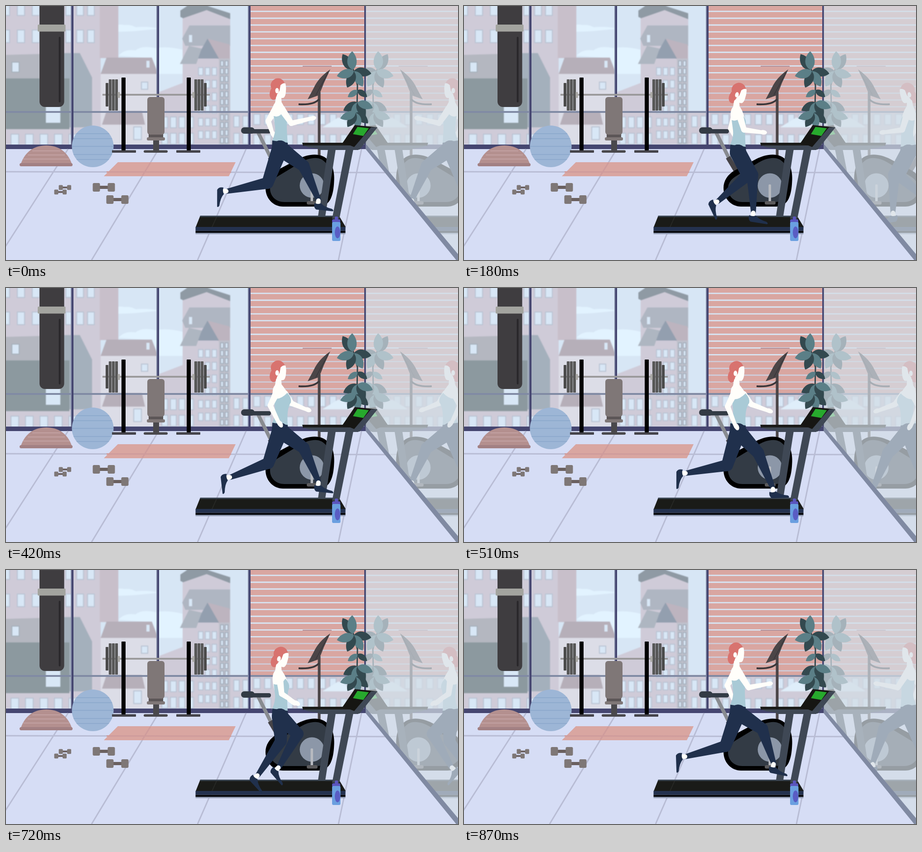
An HTML page with a canvas that plays this animation: 998 by 561 pixels, repeating every 0.9 s.

```html
<!DOCTYPE html>
<html lang="en">
<head>
<meta charset="utf-8">
<title>Treadmill run</title>
<style>
html, body { margin: 0; width: 100%; height: 100%; overflow: hidden; background: #d6ddf5; }
canvas { display: block; }
</style>
</head>
<body>
<canvas id="stage" width="998" height="561"></canvas>
<script>
const W = 998, H = 561, LOOP = 900, STEP = 30, MIRROR_X = 793, TAU = 2 * Math.PI;
const SKIN = '#fffefa', NAVY = '#20304c', STEEL = '#3f4855', FRAME = '#454670', GLASS = '#d8e7f6';
const WALL = '#cfcbd8', TEAL = '#5b7f87', DARK_LEAF = '#33494f';
let c = document.getElementById('stage').getContext('2d');

// ---- drawing helpers ----
function rect(color, x, y, w, h, r = 0) {
  c.fillStyle = color;
  c.beginPath();
  c.roundRect(x, y, w, h, r);
  c.fill();
}
function poly(color, ...p) {
  c.fillStyle = color;
  c.beginPath();
  for (let i = 0; i < p.length; i += 2) c.lineTo(p[i], p[i + 1]);
  c.fill();
}
function line(color, width, ...p) {
  c.strokeStyle = color;
  c.lineWidth = width;
  c.beginPath();
  for (let i = 0; i < p.length; i += 2) c.lineTo(p[i], p[i + 1]);
  c.stroke();
}
function shape(color, d) {
  c.fillStyle = color;
  c.fill(new Path2D(d));
}
function oval(color, x, y, rx, ry = rx, turn = 0) {
  c.fillStyle = color;
  c.beginPath();
  c.ellipse(x, y, rx, ry, turn, 0, TAU);
  c.fill();
}
// Tapered capsule between two points
function limb(color, ax, ay, ar, bx, by, br) {
  const a = Math.atan2(by - ay, bx - ax), q = Math.PI / 2;
  c.fillStyle = color;
  c.beginPath();
  c.arc(ax, ay, ar, a + q, a - q);
  c.arc(bx, by, br, a - q, a + q);
  c.fill();
}
function turned(x, y, degrees, paint) {
  c.save();
  c.translate(x, y);
  c.rotate(degrees * TAU / 360);
  paint();
  c.restore();
}
function panes(x, y, cols, rows, dx, dy, w, h, edge = '#b9c3d3') {
  for (let i = 0; i < cols; i++) for (let j = 0; j < rows; j++) {
    rect(edge, x + i * dx - 2, y + j * dy - 2, w + 4, h + 4);
    rect(GLASS, x + i * dx, y + j * dy, w, h);
  }
}
function layer(paint) {
  const canvas = document.createElement('canvas');
  canvas.width = W;
  canvas.height = H;
  const before = c;
  c = canvas.getContext('2d');
  paint();
  c = before;
  return canvas;
}

// ---- scenery ----
function city() {
  rect('#d7e6f5', 0, 0, W, H);
  shape('#e2f3ff', 'M190 57Q210 50 228 51Q242 38 262 42Q276 41 287 47Q310 44 340 50L300 54Q260 58 190 57Z');
  shape('#e2f3ff', 'M248 110Q262 94 286 98Q300 86 330 93Q360 88 395 98L395 150L330 150L320 115Z');
  // apartment block and its dark neighbour
  rect(WALL, 0, 0, 209, 306);
  rect('#c8bfca', 207, 0, 41, 115);
  panes(-7, -6, 3, 2, 33, 60, 14, 26);
  panes(133, -6, 3, 2, 24, 60, 13, 26);
  poly('#b4b7c0', 0, 108, 148, 104, 148, 162, 0, 162);
  panes(14, 125, 2, 1, 118, 1, 14, 20, '#a5b0bb');
  poly('#a4b0bc', 126, 104, 163, 104, 190, 158, 190, 268, 126, 268);
  rect('#8c999f', 0, 160, 140, 112);
  rect(GLASS, 88, 222, 32, 36);
  panes(12, 284, 5, 1, 32, 1, 15, 24);
  // terraced house
  rect('#dcdde7', 209, 148, 126, 158);
  poly('#b6afb9', 222, 114, 322, 114, 336, 150, 209, 150);
  rect(GLASS, 310, 121, 7, 15);
  poly('#b6afb9', 222, 232, 300, 232, 307, 262, 212, 262);
  panes(283, 268, 1, 1, 1, 1, 15, 26);
  panes(300, 169, 1, 1, 1, 1, 12, 14);
  // tower and gables
  poly(WALL, 390, 24, 442, 8, 495, 24, 495, 306, 338, 306, 338, 190, 390, 170);
  poly('#8f9aa4', 385, 10, 400, 0, 445, 0, 495, 16, 495, 29, 443, 9, 391, 27, 385, 24);
  poly('#afb6c2', 405, 43, 495, 43, 495, 88, 396, 88, 389, 72);
  rect(GLASS, 404, 64, 7, 16);
  poly('#bdb4bf', 445, 72, 494, 85, 494, 117, 468, 117);
  poly('#939faf', 445, 72, 420, 116, 470, 116);
  poly('#aeb6c1', 404, 88, 432, 94, 420, 128, 384, 128);
  rect('#bfc1cc', 470, 116, 25, 190);
  panes(475, 122, 2, 11, 10, 17, 4, 10, '#a3adbb');
  panes(426, 137, 3, 6, 15, 28, 8, 15);
  panes(345, 246, 4, 2, 19, 36, 11, 22);
  rect(WALL, 495, 232, 40, 74);
  panes(504, 244, 2, 2, 20, 38, 10, 22);
  // houses behind the blinds
  rect(WALL, 540, 150, 258, 156);
  panes(548, 240, 11, 2, 24, 45, 12, 21);
  poly('#dfeefa', 698, 268, 734, 246, 770, 268);
}
function blinds() {
  for (let y = -1.7; y < 225; y += 15.05) rect('#d9a6a1', 540, y, 252, 12.2);
  rect('#b0909a', 655, 132, 64, 2);
}
function floorAndFrames() {
  rect('#808aa4', 0, 232, 793, 4);
  for (const x of [143, 332, 534]) {
    rect('#8189a6', x, 0, 2, 306);
    rect(FRAME, x + 2, 0, 4, 306);
  }
  rect(FRAME, 791, 0, 3.5, 314);
  rect(FRAME, 0, 306, 794, 10);
  rect('#d6ddf5', 0, 316, W, 245);
  const grout = '#b8bcd4';
  line(grout, 3, 0, 366, 850, 368);
  line(grout, 3, 137, 316, -3, 534);
  line(grout, 3, 337, 316, 189, 561);
  line(grout, 3, 530, 316, 423, 561);
  line(grout, 3, 785, 316, 734, 561);
}
function dumbbell(x, y, s) {
  rect('#6a605f', x + 12 * s, y + 6 * s, 26 * s, 7 * s);
  for (const side of [0, 33]) rect('#7e7776', x + side * s, y, 16 * s, 19 * s, 3 * s);
}
function gymProps() {
  poly('#d9a6a1', 247, 345, 507, 345, 492, 376, 216, 376);
  line('#cf9c9c', 3, 222, 366.5, 497, 367);
  line('#cf9c9c', 3, 319, 346, 301, 375);
  // balance dome and ball
  shape('#b4908f', 'M33 348C42 322 62 308 89 308S136 322 145 348Z');
  for (let i = 0; i < 3; i++) line('#c8a9aa', 1.5, 58 - 10 * i, 320 + 9 * i, 120 + 10 * i, 320 + 9 * i);
  rect('#a28083', 30, 347, 117, 7, 3.5);
  oval('#9db6d6', 191.5, 310, 46);
  for (const dy of [-28, -17, 0, 18, 29]) {
    const half = Math.sqrt(46 * 46 - dy * dy);
    line('#8aa6ca', 1.5, 191.5 - half, 310 + dy, 191.5 + half, 310 + dy);
  }
  // punching bag
  rect('#3f3d40', 74, 0, 54.5, 223, [0, 0, 12, 12]);
  rect('#a3a49f', 70, 41, 61.5, 15.5, 2);
  rect('#29272a', 116.5, 68, 4, 145, 2);
  // rack and barbell
  rect('#9b9a9b', 213, 194, 237, 4);
  for (const side of [-1, 1]) {
    const part = (color, d, y, w, h) => rect(color, 331.5 + side * d - w / 2, y, w, h, 1);
    part('#44434a', 71, 318.5, 53, 5.5);
    part('#000', 72, 158, 9, 161);
    for (const d of [87.5, 94.5, 101.5]) part('#575757', d, 162, 6.2, 69);
    part('#4a4a4a', 108.5, 170, 6, 52);
    part('#aaa9a6', 82.5, 190, 5, 13);
  }
  // bench
  rect('#49484c', 304, 318.5, 53, 5.5, 3);
  rect('#49484c', 325, 295, 13, 25);
  rect('#5c5657', 315, 280, 32, 12);
  rect('#7f7777', 312, 201, 38, 83, 6);
  rect('#7f7777', 311, 290, 40, 7, 3);
  for (const i of [0, 1]) {
    dumbbell(191.5 + 30 * i, 391 + 27 * i, 1);
    dumbbell(116.5 - 10 * i, 395.5 + 10 * i, .56);
  }
}
// A fan of pointed leaves, alternating light and dark
function fan(x, y, size, from, to, count) {
  for (let i = 0; i < count; i++) turned(x, y, from + (to - from) * i / (count - 1), () => {
    const s = size / 40;
    shape(i % 2 ? TEAL : DARK_LEAF, `M0 0C${8 * s} ${-15 * s} ${28 * s} ${-14 * s} ${40 * s} 0C${28 * s} ${12 * s} ${8 * s} ${13 * s} 0 0Z`);
  });
}
function plant() {
  line(DARK_LEAF, 3, 764, 130, 776, 175, 774, 275);
  fan(765, 141, 41, -122, -91, 2);
  fan(768, 144, 39, 8, 164, 4);
  fan(776, 186, 26, 35, 145, 2);
  fan(776, 213, 36, 150, 20, 4);
  fan(772, 236, 36, 40, 160, 4);
}
function bike() {
  line('#888b90', 8, 557, 280, 586, 338);
  line('#454347', 11, 583, 334, 601, 364);
  rect('#333b45', 519, 268, 30, 14, 7);
  rect('#333b45', 528, 272, 57, 9.5, 4.5);
  rect('#4b4547', 688.5, 190, 6, 145);
  shape('#4b4547', 'M716 140Q690 158 680 180L666 206L691 197Q695 188 702 170Z');
  line('#38353a', 1.5, 711, 147, 684, 197);
  c.strokeStyle = '#3b373a';
  c.lineWidth = 4;
  c.stroke(new Path2D('M646 217Q680 219 691 206'));
  shape('#000', 'M573 402C573 386 582 372 598 363L645 338C664 328 685 325 700 332C721 342 727 366 724 394C722 421 714 443 690 443L612 443C589 443 573 424 573 402Z');
  shape('#333b45', 'M583 403C583 391 590 382 602 375L650 346C668 335 686 333 697 339C714 349 717 368 715 393C713 416 707 433 687 433L615 433C596 433 583 420 583 403Z');
  oval('#8c97a8', 675.5, 396.5, 27);
  rect('#b7bac0', 672.5, 394, 5.5, 40, 2);
  rect('#5c5b5d', 664, 431, 24, 7.5, 3.5);
}
function treadmill() {
  poly('#1a1b18', 429, 463, 735, 463, 750, 488, 419, 488);
  poly('#3b4652', 429, 463, 735, 463, 737, 466, 428, 466);
  line('#272825', 2, 465, 466, 455, 488);
  rect('#24324f', 418.5, 488, 331, 8.5);
  rect('#05070c', 418.5, 496.5, 331, 4.5);
  rect('#929cb3', 418.5, 501, 331, 3);
  poly(STEEL, 711, 316, 728, 316, 705, 464, 689, 464);
  poly(STEEL, 750, 316, 767, 316, 736, 470, 720, 470);
  poly('#1b1b19', 654, 302, 780, 302, 776, 309, 656, 309);
  poly(STEEL, 656, 308, 782, 308, 778, 318, 692, 318, 690, 315, 668, 312);
  poly('#161613', 742, 304, 770, 263, 820, 268, 780, 316, 760, 308);
  poly(STEEL, 806, 268, 820, 268, 781, 317, 764, 317);
  poly('#27a92d', 776, 267, 801, 270, 789, 287, 766, 283);
}
function bottle() {
  rect('#5a55bd', 726, 465, 7, 8, 2);
  rect('#5a55bd', 720, 471, 18, 8, 3);
  rect('#6a9fe0', 720, 477, 18.5, 42, 3);
  oval('#5a5dc4', 732, 500, 6, 13);
}

// ---- runner: every joint swings on the stride and its double ----
const swing = (a, mid, cos1, sin1 = 0, cos2 = 0, sin2 = 0) =>
  mid + cos1 * Math.cos(a) + sin1 * Math.sin(a) + cos2 * Math.cos(2 * a) + sin2 * Math.sin(2 * a);

function leg(a, hipY) {
  const kx = swing(a, 623, 40, -2, -6, -3), ky = swing(a, 372, -18, 2, -1, 6);
  const ax = swing(a, 590, 100, 19);
  const ay = Math.min(455, swing(a, 434, 8, 15, -14, -3));
  const footAngle = swing(a, 44, -41, -20, 3, -2);
  limb(NAVY, 605, hipY, 18, kx, ky, 13);
  limb(NAVY, kx, ky, 13, ax, ay, 5.5);
  turned(ax, ay, footAngle, () => {
    limb(SKIN, 0, 2, 5, 0, 9, 5);
    shape(NAVY, 'M-8 8Q0 11 6 7Q15 15 32 17Q37 20 34 22L-3 22Q-10 18 -8 8Z');
  });
}
function arm(sx, sy, ex, ey, hx, hy) {
  limb(SKIN, sx, sy, 8, ex, ey, 6);
  limb(SKIN, ex, ey, 6, hx, hy, 4);
  oval(SKIN, hx + 2, hy, 8, 5, Math.atan2(hy - ey, hx - ex));
}
function head(tilt) {
  turned(600, 207, tilt, () => {
    c.translate(-600, -207);
    shape('#d8736f', 'M616 173C613 160 600 156 591 163C584 168 583 176 586 182C580 191 581 203 588 207C594 209 598 204 599 198L608 190Z');
    shape(SKIN, 'M604 187L606 175Q612 169 617 171Q619 181 618 187Q618 197 614 202Q611 204 607 203L607 212L597 212L598 196Z');
    oval(SKIN, 598.5, 187, 4, 6);
  });
}
function runner(t) {
  const a = t / LOOP * TAU;
  const drop = swing(a, 5, 0, 0, -5), twist = swing(a, .5, -.45, -.15);
  const shoulderY = 226 + drop * .8, front = 618 + 10 * twist;
  arm(595 + 22 * twist, shoulderY + 8 * twist,
    swing(a, 606, -27, -9), swing(a, 263, 0, 0, -9),
    swing(a, 629, -40, -17), swing(a, 284, 8, 0, -8));
  c.save();
  c.translate(0, drop);
  head(drop * 1.3);
  limb(SKIN, 602, 203, 6, 601, 220, 8);
  shape(SKIN, `M596 212L607 211Q614 218 ${front} 240L617 265L595 265Q587 238 589 225Q590 217 596 212Z`);
  shape('#a9cad6', `M591 243Q605 248 ${front - 6} 231Q${front + 4} 242 ${front + 2} 252Q619 266 622 304L587 299Q596 280 594 266Z`);
  poly(NAVY, 588, 297, 622, 302, 623, 314, 587, 314);
  c.restore();
  leg(a + TAU * 8 / 15, 315 + drop);
  leg(a, 315 + drop);
  arm(608 - 9 * twist, shoulderY,
    swing(a, 606, 24, 5), swing(a, 267, 0, 0, -8),
    swing(a, 638, 37, 10), swing(a, 286, -27, -8, -11));
}

// ---- composition ----
const cityLayer = layer(city);
const room = layer(() => {
  c.filter = 'blur(1.3px)';
  c.drawImage(cityLayer, 0, 0);
  c.filter = 'none';
  blinds();
  floorAndFrames();
  gymProps();
});
const gear = layer(() => {
  plant();
  bike();
  treadmill();
});

function render(now) {
  const t = Math.floor((now % LOOP) / STEP) * STEP;
  c.drawImage(room, 0, 0);
  c.save();
  c.beginPath();
  for (const [x, y] of [[794, 0], [W, 0], [W, 555], [794, 310]]) c.lineTo(x, y);
  c.clip();
  c.translate(2 * MIRROR_X, 0);
  c.scale(-1, 1);
  c.drawImage(room, 0, 0);
  c.drawImage(gear, 0, 0);
  runner(t);
  c.restore();
  c.save();
  c.globalAlpha = .71;
  poly('#d4dee6', 794.5, 0, W, 0, W, 555, 794.5, 310);
  c.restore();
  poly('#808aa2', 794, 304, W, 548, W, 561, 994, 561, 794, 316);
  c.drawImage(gear, 0, 0);
  runner(t);
  bottle();
}
const start = performance.now();
function tick() {
  render(performance.now() - start);
  requestAnimationFrame(tick);
}
tick();
</script>
</body>
</html>
```
